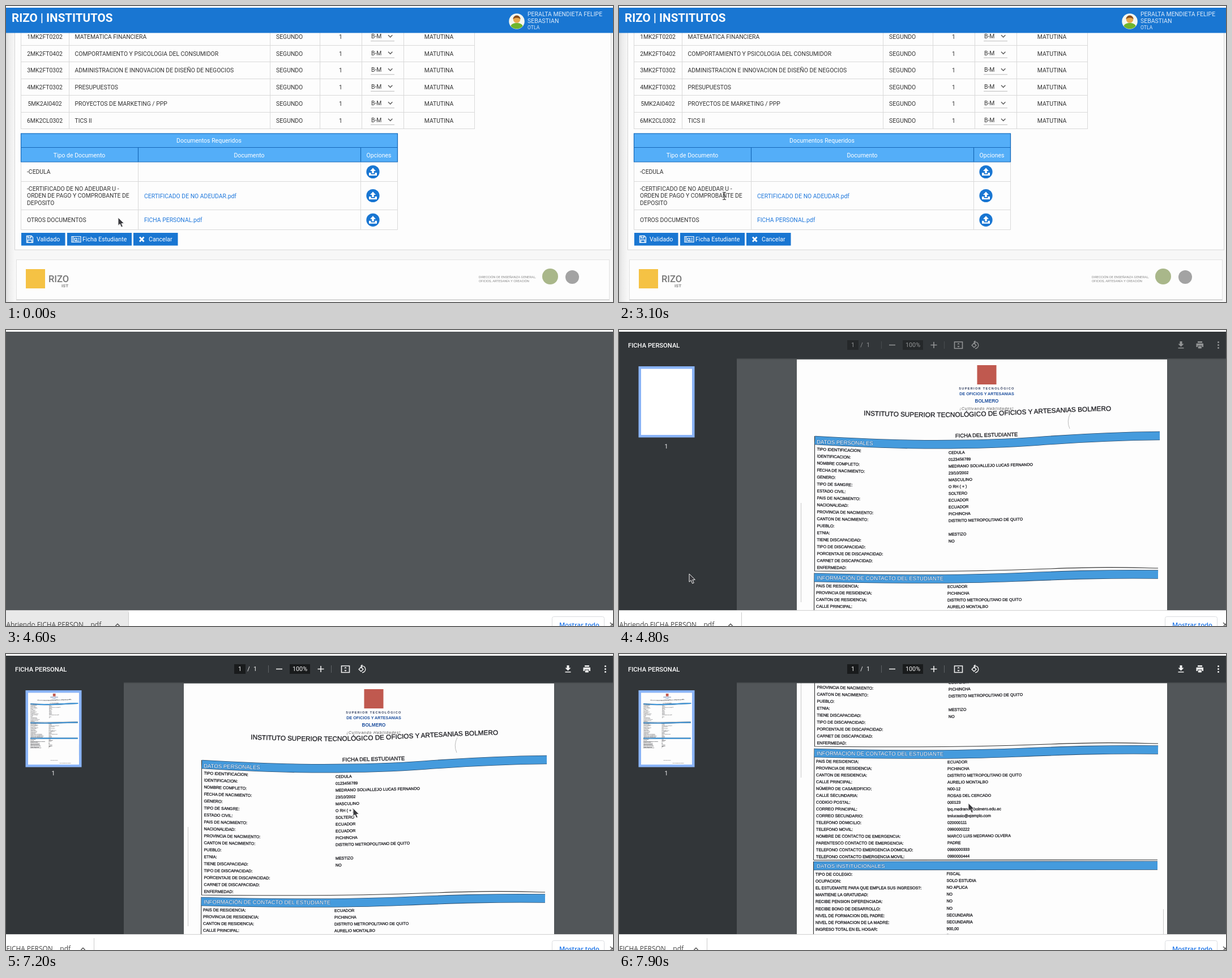
Write an HTML page that moves like this. It is 1072 by 522 pixels and loops after 8 s.

```html
<!DOCTYPE html>
<html lang="es">
<head>
<meta charset="utf-8">
<title>Ficha del estudiante</title>
<style>
html, body { margin: 0; width: 100%; height: 100%; overflow: hidden; background: #fff; }
svg { display: block; width: 100vw; height: 100vh; }
text { white-space: pre; }
.web { font-family: Roboto, sans-serif; fill: #333; }
.shelf { font-family: "Open Sans", "Noto Sans", sans-serif; fill: #444; }
.doc { font-family: "Liberation Sans", Arial, sans-serif; fill: #17171c; }
.ink { stroke: #17171c; stroke-width: .28; }
.mid { text-anchor: middle; }
.grid { stroke: #d9d9d9; fill: none; }
.line { fill: none; stroke: #f1f1f1; stroke-width: 1.6; }
.band { fill: #fff; stroke: #2a6dab; stroke-width: 1; paint-order: stroke; }
</style>
</head>
<body>
<svg id="stage" viewBox="0 0 1072 522" preserveAspectRatio="none"></svg>
<script>
const BLUE = '#1976d2';

// Text whose capitals are centred on y
const t = (s, x, y, size = 10.4, attrs = '') =>
  `<text x="${x}" y="${(y + size * .36).toFixed(2)}" font-size="${size}" ${attrs}>${s}</text>`;
const mid = (s, x, y, size, attrs = '') => t(s, x, y, size, 'class="mid" ' + attrs);
const box = (x, y, w, h, fill, attrs = '') =>
  `<rect x="${x}" y="${y}" width="${w}" height="${h}" fill="${fill}" ${attrs}/>`;
const path = (d, attrs = '') => `<path d="${d}" ${attrs}/>`;
const dot = (x, y, r, fill) => `<circle cx="${x}" cy="${y}" r="${r}" fill="${fill}"/>`;

function courses() {
  const rows = [
    ['1MK2FT0202', 'MATEMATICA FINANCIERA'],
    ['2MK2FT0402', 'COMPORTAMIENTO Y PSICOLOGIA DEL CONSUMIDOR'],
    ['3MK2FT0302', 'ADMINISTRACION E INNOVACION DE DISEÑO DE NEGOCIOS'],
    ['4MK2FT0302', 'PRESUPUESTOS'],
    ['5MK2AI0402', 'PROYECTOS DE MARKETING / PPP'],
    ['6MK2CL0302', 'TICS II']
  ];
  const cols = [26.5, 111.5, 466.5, 554.5, 628.5, 702.5, 827.5].map(x => `M${x} 47V216.5`).join('');
  const lines = [69.5, 98.5, 128.5, 157.5, 187.5, 216.5].map(y => `M26 ${y}H828`).join('');
  return path(cols + lines, 'class="grid"') + rows.map(([code, name], i) => {
    const y = 54.3 + i * 29.5;
    return mid(code, 68.5, y) + t(name, 121.5, y) + t('SEGUNDO', 477, y) + mid('1', 591, y) +
      t('B-M', 645, y - .8) + mid('MATUTINA', 764.5, y) +
      path(`M675 ${y - 3}l3.7 3.7l3.7 -3.7`, 'fill="none" stroke="#555" stroke-width="1.3"') +
      path(`M644 ${y + 7.5}h42`, 'stroke="#bbb"');
  }).join('');
}

const upload = y => dot(648, y, 11.6, BLUE) +
  path(`M648 ${y - 7}l5 5.5h-3.2v4h-3.6v-4h-3.2zM641 ${y + 1.5}h3.5v2.8h7v-2.8h3.5v5h-14z`, 'fill="#fff"');

function documents() {
  const white = 'fill="#fff"', link = 'fill="#1f78dc"';
  return box(26, 224.5, 666, 50.5, '#54aef8') +
    path('M26.5 225H691.5V275H26.5ZM26 249.5H692M233.5 249V275M626.5 249V275', 'fill="none" stroke="#1668b8" stroke-width="1.2"') +
    mid('Documentos Requeridos', 358.5, 237.3, 10.5, white) +
    mid('Tipo de Documento', 129.5, 263, 10.5, white) +
    mid('Documento', 429.5, 263, 10.5, white) + mid('Opciones', 658.5, 263, 10.5, white) +
    path('M26.5 276V394.5H691.5V276M26 309.5H692M26 359.5H692M233.5 276V394M626.5 276V394', 'class="grid"') +
    t('-CEDULA', 37, 292.7) +
    t('-CERTIFICADO DE NO ADEUDAR U -', 37, 322.3) +
    t('ORDEN DE PAGO Y COMPROBANTE DE', 37, 334.7) + t('DEPOSITO', 37, 347) +
    t('OTROS DOCUMENTOS', 37, 377.6) +
    t('CERTIFICADO DE NO ADEUDAR.pdf', 244, 334.8, 10.4, link) +
    t('FICHA PERSONAL.pdf', 244, 377.6, 10.4, link) +
    [292.5, 334.5, 377.3].map(upload).join('');
}

function buttons() {
  const items = [[27, 77.5, 'Validado', 54], [108, 114, 'Ficha Estudiante', 135], [225, 78.5, 'Cancelar', 252]];
  return items.map(([x, w, label, tx]) =>
    box(x, 400, w, 22.5, BLUE) + t(label, tx, 411.5, 10.6, 'fill="#fff"')).join('') +
    path('M36.5 405.5H45L47.5 408V417H36.5ZM39 405.5V409H44V405.5M38.5 417V412.5H45.5V417', 'fill="none" stroke="#fff" stroke-width="1.3"') +
    path('M116 406.5H132V416.5H116ZM118.5 406.5V416.5M121 409.5h4v3.5h-4zM127 409.5h3M127 412h3M121 414.5h9', 'fill="none" stroke="#fff" stroke-width="1.2"') +
    path('M236 407.5L243.5 415.5M243.5 407.5L236 415.5', 'stroke="#fff" stroke-width="2.8"');
}

function footer() {
  return box(18.5, 447.5, 1047, 70, '#fdfdfd', 'stroke="#e2e2e2"') +
    path('M18 518.5H1066', 'stroke="#c9c9c9"') +
    box(35, 464, 34, 34, '#f5c244') +
    t('RIZO', 75, 481, 16.5, 'font-weight="500" fill="#777"') +
    t('IST', 98, 493.3, 8, 'font-weight="700" fill="#888"') +
    t('DIRECCIÓN DE ENSEÑANZA GENERAL,', 835, 478, 5.8, 'fill="#888"') +
    t('OFICIOS, ARTESANÍA Y CREACIÓN', 835, 484.5, 5.8, 'fill="#888"') +
    dot(961, 477, 14, '#a9b78a') + dot(1000, 478, 12, '#a3a3a3');
}

function page() {
  return `<g class="web">` + box(0, 0, 1072, 522, '#f7f7f7') +
    box(0, 47, 16, 475, 'url(#side)') +
    box(15.5, 40, 1053, 390, '#fdfdfd', 'stroke="#d6d6d6"') +
    courses() + documents() + buttons() + footer() +
    box(0, 0, 1072, 3, '#fff') + box(0, 3, 1072, 44.5, BLUE) +
    t('RIZO | INSTITUTOS', 10, 21, 20.6, 'font-weight="700" fill="#fff"') +
    dot(902, 27, 13.8, '#f4f6ee') +
    path('M891.5 35.5C892 28 912 28 912.5 35.5A13.8 13.8 0 0 1 891.5 35.5Z', 'fill="#6fb52c"') +
    dot(902, 23.5, 6.3, '#e9a94c') + path('M895.5 23A6.5 6.5 0 0 1 908.5 23Q902 18.5 895.5 23Z', 'fill="#8a4f1d"') +
    t('PERALTA MENDIETA FELIPE', 921, 14, 10.5, 'fill="#dceafa"') +
    t('SEBASTIAN', 921, 26.3, 10.5, 'fill="#dceafa"') + t('OTLA', 921, 37.5, 8.6, 'fill="#dceafa"') + '</g>';
}

// Label and value rows of one section of the form
function rows(list, x, y, step, vx, vy, vstep, tilt, vtilt) {
  return list.map((row, i) => {
    const [label, value] = row.split('|');
    const ly = y + i * step, ry = vy + i * vstep, a = tilt * (1 - i / list.length);
    return t(label, x, ly, 7.18, `class="ink" transform="rotate(${a} ${x} ${ly})"`) +
      (value ? t(value, vx, ry, 7.05, `class="ink" transform="rotate(${vtilt} ${vx} ${ry})"`) : '');
  }).join('');
}

const band = (d, label, y, a) =>
  path(d, 'fill="none" stroke="#23486b" stroke-width="15.6"') +
  path(d, 'fill="none" stroke="#459bdd" stroke-width="14"') +
  t(label, 349, y, 9.6, `class="band" transform="rotate(${a} 349 ${y})"`);

function sheet() {
  const personal = ['TIPO IDENTIFICACION:|CEDULA', 'IDENTIFICACION:|0123456789',
    'NOMBRE COMPLETO:|MEDRANO SOLVALLEJO LUCAS FERNANDO', 'FECHA DE NACIMIENTO:|23/10/2002',
    'GENERO:|MASCULINO', 'TIPO DE SANGRE:|O RH ( + )', 'ESTADO CIVIL:|SOLTERO',
    'PAIS DE NACIMIENTO:|ECUADOR', 'NACIONALIDAD:|ECUADOR', 'PROVINCIA DE NACIMIENTO:|PICHINCHA',
    'CANTON DE NACIMIENTO:|DISTRITO METROPOLITANO DE QUITO', 'PUEBLO:', 'ETNIA:|MESTIZO',
    'TIENE DISCAPACIDAD:|NO', 'TIPO DE DISCAPACIDAD:', 'PORCENTAJE DE DISCAPACIDAD:',
    'CARNET DE DISCAPACIDAD:', 'ENFERMEDAD:'];
  const contact = ['PAIS DE RESIDENCIA:|ECUADOR', 'PROVINCIA DE RESIDENCIA:|PICHINCHA',
    'CANTON DE RESIDENCIA:|DISTRITO METROPOLITANO DE QUITO', 'CALLE PRINCIPAL:|AURELIO MONTALBO',
    'NÚMERO DE CASA/EDFICIO:|N00-12', 'CALLE SECUNDARIA:|ROSAS DEL CERCADO', 'CODIGO POSTAL:|000123',
    'CORREO PRINCIPAL:|lpq.medrano@bolmero.edu.ec', 'CORREO SECUNDARIO:|tmlucasio@ejemplo.com',
    'TELEFONO DOMICILIO:|020000111', 'TELEFONO MOVIL:|0990000222',
    'NOMBRE DE CONTACTO DE EMERGENCIA:|MARCO LUIS MEDRANO OLVERA',
    'PARENTESCO CONTACTO DE EMERGENCIA:|PADRE',
    'TELEFONO CONTACTO EMERGENCIA DOMICILIO:|0990000333',
    'TELEFONO CONTACTO EMERGENCIA MOVIL:|0990000444'];
  const school = ['TIPO DE COLEGIO:|FISCAL', 'OCUPACION:|SOLO ESTUDIA',
    'EL ESTUDIANTE PARA QUE EMPLEA SUS INGRESOS?:|NO APLICA', 'MANTIENE LA GRATUIDAD:|NO',
    'RECIBE PENSION DIFERENCIADA:|NO', 'RECIBE BONO DE DESARROLLO:|NO',
    'NIVEL DE FORMACION DEL PADRE:|SECUNDARIA', 'NIVEL DE FORMACION DE LA MADRE:|SECUNDARIA',
    'INGRESO TOTAL EN EL HOGAR:|900,00', 'NUMERO DE MIEMBROS EN EL HOGAR:|5'];
  const navy = 'fill="#1d4f9e"';
  return box(314, 52, 654, 923, '#fdfdfd') +
    box(632.5, 62, 34, 34, '#c0594f') +
    mid('SUPERIOR TECNOLÓGICO', 649.5, 102.5, 5.6, 'font-weight="700" letter-spacing="1.3" fill="#2c3a5c"') +
    mid('DE OFICIOS Y ARTESANIAS', 649.5, 112.5, 7.2, 'font-weight="700" ' + navy) +
    mid('BOLMERO', 649.5, 125, 8.2, 'font-weight="700" ' + navy) +
    mid('¡Cultivando Habilidades!', 649.5, 138.5, 6.8, 'font-style="italic" letter-spacing=".9" fill="#555"') +
    '<path id="arc" d="M432 150.5C500 153 560 155 640 152S780 144 890 142" fill="none"/>' +
    '<text class="ink" font-size="11.75"><textPath href="#arc">INSTITUTO SUPERIOR TECNOLÓGICO DE OFICIOS Y ARTESANIAS BOLMERO</textPath></text>' +
    t('FICHA DEL ESTUDIANTE', 594, 186.3, 9.4, 'class="ink" transform="rotate(-1.3 594 186)"') +
    path('M797 147Q790 161 796 174', 'fill="none" stroke="#aaa" stroke-width=".8"') +
    path('M321.5 305V480M961.5 712V850', 'stroke="#bbb" stroke-width=".8"') +
    path('M345.5 187L345.5 425C560 427 650 425 760 421S900 419 952 420M345 428.5L343.5 625M343.5 625.5L951 625M343.5 628V768', 'fill="none" stroke="#333" stroke-width="1.1"') +
    band('M346 194.5C430 199 470 201 520 201.5S660 202 740 196S900 187 955 186.5', 'DATOS PERSONALES', 197, 1.6) +
    band('M345 436.5C480 440 600 440 700 436S860 430 952 431', 'INFORMACIÓN DE CONTACTO DEL ESTUDIANTE', 437, .3) +
    band('M344 635.5L951 635', 'DATOS INSTITUCIONALES', 635.3, 0) +
    rows(personal, 349.5, 210, 12.28, 582, 216.2, 12, 2, -1.2) +
    rows(contact, 348, 451.2, 12, 580, 452.4, 11.87, .3, -.4) +
    rows(school, 347, 650.5, 12.1, 578.5, 649.5, 12.1, 0, 0) +
    mid('FIRMA DEL ESTUDIANTE', 648, 917, 8) + mid('FECHA DE IMPRESION DEL REPORTE', 790, 952, 8);
}

function toolbar() {
  return t('FICHA PERSONAL', 16, 26.7, 11.2, 'font-weight="500" fill="#fff"') +
    '<g id="tools">' + box(403, 18, 20, 17, '#191b1c') + box(501, 18, 36, 17, '#191b1c') +
    mid('1', 413, 26.5, 10.8) + mid('/', 428.5, 26.5, 10.8) + mid('1', 440, 26.5, 10.8) + mid('100%', 519, 26.5, 10.8) +
    path('M463.5 20V33M574.5 20V33', 'stroke="#5f6366"') +
    path('M477 26.5h11M550.5 26.5h11M556 21v11', 'class="line"') +
    path('M592.5 21h14v11.5h-14z', 'class="line"') +
    path('M599.5 22.7l2.3 2.6h-4.6zM599.5 30.8l2.3 -2.6h-4.6z') +
    path('M627 23l3.9 3.9l-3.9 3.9l-3.9 -3.9zM629 21.1A5.8 5.8 0 0 1 629 32.7', 'class="line" style="stroke-width:1.4"') +
    path('M629.3 18.2V24L626 21.1Z') +
    path('M990.5 20h4v4.5h3l-5 5l-5 -5h3zM987.5 31h10v1.6h-10z') +
    path('M1022 20h8v2.6h-8zM1019.5 23.7h12.5v6.3h-2.4v-2.5h-7.7v2.5h-2.4zM1022.8 28.6h6v4h-6z') +
    [21.5, 26.5, 31.5].map(y => dot(1058.5, y, 1.5, '#f1f1f1')).join('') + '</g>';
}

function viewer() {
  return '<g id="viewer">' + box(0, 0, 1072, 522, '#525659') + box(0, 0, 1072, 3, '#fff') +
    '<g id="chrome">' +
    '<g id="paper" clip-path="url(#view)"><g id="scroll"><g id="sheet" class="doc">' + sheet() + '</g></g></g>' +
    box(0, 3, 1072, 47, '#323639') + box(0, 49, 208, 446, '#323639') + box(208, 50, 864, 1.5, '#44484b') +
    '<g class="web" style="fill:#f1f1f1">' + toolbar() +
    '<g id="thumb">' + '<rect id="rim" x="34.5" y="64" width="99" fill="#8ab4f8"/><rect id="mini" x="39" y="68.5" width="90" fill="#fff"/>' +
    '<g id="copy" clip-path="url(#small)"><use href="#sheet" transform="translate(39 68.5) scale(.1376) translate(-314 -52)"/></g>' +
    '<g id="num">' + mid('1', 83.5, 205, 10.4) + '</g></g></g></g></g>';
}

const up = x => path(`M${x - 3.7} 522l3.7 -3.7l3.7 3.7`, 'fill="none" stroke="#555" stroke-width="1.5"');

function shelf() {
  return '<g id="shelf" class="shelf">' +
    '<g id="bar">' + box(0, 482, 1072, 13, '#f4f4f4') + box(0, 484, 1061, 8.5, '#bdbdbd') +
    path('M1066.5 485l3.5 3.3l-3.5 3.3z', 'fill="#444"') + '</g>' +
    box(0, 494, 1072, 90, '#fff') + path('M0 494.5H1072', 'stroke="#cfcfcf"') +
    '<g clip-path="url(#chip)"><circle id="ripple" cx="45" cy="520" fill="#d6d6d6"/></g>' +
    '<g id="ready">' + t('FICHA PERSON....pdf', .5, 519.6, 11.9) + up(136) + path('M155.5 501V522', 'stroke="#ccc"') + '</g>' +
    '<g id="opening">' + box(0, 495, 217, 60, '#e9e9e9', 'id="hover"') + t('Abriendo FICHA PERSON....pdf', .5, 519.6, 11.9) + up(197) +
    path('M216.5 498V522', 'stroke="#ccc"') + '</g>' +
    box(964.5, 505.5, 92, 40, '#fff', 'rx="3" stroke="#dadce0"') +
    t('Mostrar todo', 977, 519.8, 11.2, 'font-weight="600" fill="#1a73e8"') +
    path('M1067 516l7 7M1067 523l7 -7', 'stroke="#555" stroke-width="1.4"') + '</g>';
}

const $ = id => document.getElementById(id);
$('stage').innerHTML = `<defs>
  <linearGradient id="side"><stop stop-color="#dedede"/><stop offset=".35" stop-color="#ececec"/><stop offset="1" stop-color="#f8f8f8"/></linearGradient>
  <clipPath id="view"><rect x="208" y="50" width="864" height="444"/></clipPath>
  <clipPath id="small"><rect x="39" y="68.5" width="90" height="126.5"/></clipPath>
  <clipPath id="chip"><rect x="0" y="497" width="155" height="60"/></clipPath></defs>` +
  page() + viewer() + shelf() +
  '<g id="arrow">' + path('M0 0V14.2L3.3 11.4L5.6 17L8.3 15.9L6 10.6L10.4 10.3Z', 'fill="#3a3a3e" stroke="#f0f0f0"') + '</g>' +
  '<g id="beam">' + path('M-3 -6.5H-.8L0 -5.7L.8 -6.5H3M0 -6V6M-3 6.5H-.8L0 5.7L.8 6.5H3', 'fill="none" stroke="#333" stroke-width="1.2"') + '</g>';

// Pointer path: time, x, y
const track = [[0, 198, 373], [600, 413, 342], [900, 413, 342], [1300, 504, 336], [1800, 310, 318],
  [2000, 184, 320], [2200, 184, 320], [2400, 167, 318], [2700, 167, 318], [2900, 181, 352], [3000, 181, 352],
  [3100, 186, 335], [3300, 584, 358], [3400, 584, 358], [4000, 155, 342], [4100, 155, 342], [4400, 50, 526],
  [4600, 50, 521], [4800, 124, 430], [5000, 357, 268], [5400, 500, 205], [5900, 692, 168], [6000, 697, 155],
  [6500, 645, 309], [6800, 595, 276], [6900, 611, 282], [7100, 611, 282], [7200, 613, 272], [7400, 613, 272], [7900, 617, 263]];

function pointer(now) {
  const i = track.findIndex(k => k[0] >= now);
  if (i < 1) return track[0].slice(1);
  const [t0, x0, y0] = track[i - 1], [t1, x1, y1] = track[i];
  const p = (now - t0) / (t1 - t0);
  return [x0 + (x1 - x0) * p, y0 + (y1 - y0) * p];
}

const ramp = (now, a, b) => Math.min(1, Math.max(0, (now - a) / (b - a)));
const show = (id, on) => { $(id).style.display = on ? '' : 'none'; };
const move = (id, x, y) => $(id).setAttribute('transform', `translate(${x} ${y})`);

function draw() {
  const now = Math.floor(performance.now() % 8000 / 100) * 100;
  const [x, y] = pointer(now), text = now >= 2000 && now <= 3100, loaded = now >= 4900;
  show('beam', text);
  show('arrow', !text);
  move(text ? 'beam' : 'arrow', x, y);

  show('shelf', now >= 4200);
  move('shelf', 0, 40 * (1 - ramp(now, 4100, 4300)));
  show('bar', now < 4600);
  $('ripple').setAttribute('r', now < 4600 ? 60 * ramp(now, 4300, 4500) : 0);
  const opening = now >= 4600 && now < 7200;
  show('opening', opening);
  show('ready', !opening);
  $('hover').setAttribute('opacity', 1 - ramp(now, 4600, 4800));

  show('viewer', now >= 4600);
  show('chrome', now >= 4700);
  show('paper', now >= 4800);
  show('thumb', now >= 4800);
  show('copy', loaded);
  $('tools').setAttribute('opacity', loaded ? 1 : .5);
  $('rim').setAttribute('height', loaded ? 135.5 : 125.5);
  $('mini').setAttribute('height', loaded ? 126.5 : 116.5);
  move('num', 0, loaded ? 5 : 0);
  move('scroll', 0, -262 * ramp(now, 7400, 7900));
  requestAnimationFrame(draw);
}
draw();
</script>
</body>
</html>
```
